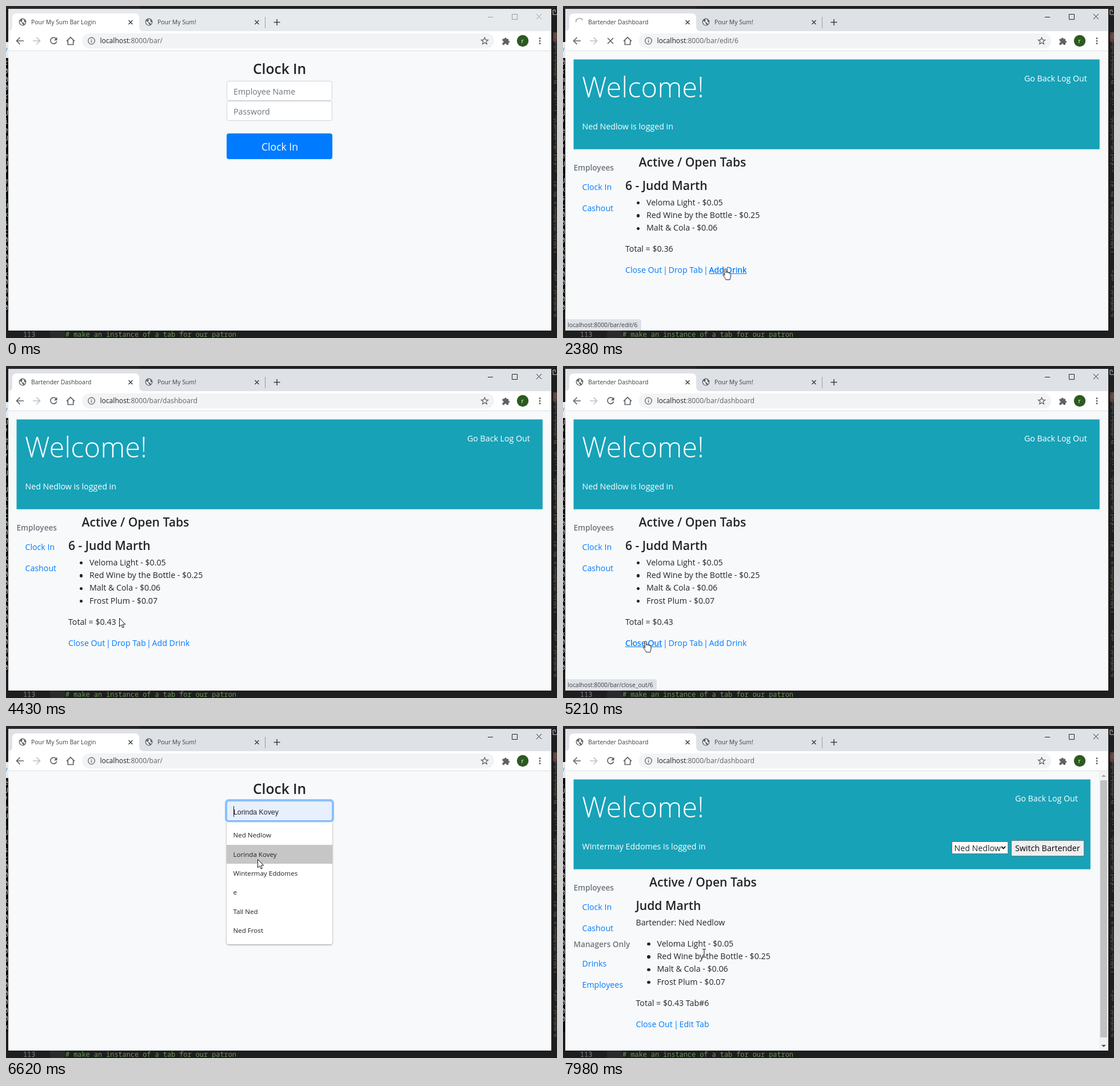
Write an HTML page that moves like this. It is 964x581 px and loops after 8000 ms.

```html
<!DOCTYPE html>
<html lang="en">
<head>
<meta charset="utf-8">
<title>Bar tabs demo</title>
<style>
html, body { margin: 0; width: 100%; height: 100%; overflow: hidden; background: #1e1e1e; }
#stage { position: absolute; left: 0; top: 0; width: 964px; height: 581px; overflow: hidden; background: #1e1e1e;
  font: 14.2px "Open Sans", "Noto Sans", sans-serif; color: #212529; }
#stage div, #stage svg, #stage span { position: absolute; box-sizing: border-box; }
svg { left: 0; top: 0; overflow: visible; }
#stage i { font-style: normal; }
.layer { left: 0; top: 0; width: 964px; height: 581px; }
.t { line-height: 0; white-space: pre; }
.tab { font-size: 10.4px; color: #3c4043; }
.url { font-size: 12.1px; color: #5f6368; }
.h2, .h3, .h4, .h5, .h6 { font-weight: 600; }
.h2 { font-size: 28.1px; }
.h3 { font-size: 24.6px; }
.h4 { font-size: 21.1px; }
.h5 { font-size: 17.6px; }
.h6 { font-size: 13.6px; color: #6c757d; }
.hero { font-size: 48.8px; font-weight: 300; }
.white { color: #fff; }
.link { color: #007bff; }
.u { text-decoration: underline; }
.hint { color: #6c757d; }
.dots { font-size: 15.4px; color: #495057; }
.big { font-size: 17.6px; }
.opt { font-size: 11.6px; font-weight: 500; color: #202124; }
.preview { font: 12.33px/0 "Liberation Sans", Arial, sans-serif; }
.mono { font: 11.87px "Noto Sans Mono", "DejaVu Sans Mono", monospace; line-height: 0; }
.field { left: 386px; width: 185px; height: 35px; background: #fff; border: 1px solid #ced4da; border-radius: 4px; }
.auto { background: #e8f0fe; }
.focus { border-color: #80bdff; box-shadow: 0 0 0 3px rgba(0,123,255,.25); }
.submit { left: 386px; top: 223px; width: 185px; height: 45px; background: #007bff; border-radius: 4px; }
.hover { background: #0069d9; }
.ring { box-shadow: 0 0 0 3px rgba(0,123,255,.45); }
.menu { left: 386px; top: 167px; width: 185px; height: 215px; background: #fff; border-radius: 0 0 4px 4px;
  box-shadow: 0 1px 3px rgba(0,0,0,.4); }
.row { left: 386px; width: 185px; height: 33px; background: #c6c6c6; }
.btn { height: 27.7px; padding: 0 6px; border: 1px solid #767676; border-radius: 2px; background: #efefef;
  color: #000; line-height: 26px; white-space: pre; }
.status { left: 4px; top: 548px; height: 20px; padding: 0 7px 0 4px; background: #dee1e6; border-radius: 0 4px 0 0;
  font-size: 10.4px; line-height: 21px; color: #3c4043; white-space: pre; }
.wide { width: 315px; }
.dot { width: 5.4px; height: 5.4px; border-radius: 50%; background: #212529; }
#log { left: 0; top: 92px; width: 4px; height: 443px; overflow: hidden; background: #0c0c0c; }
#lines { left: -3.5px; top: 0; color: #ccc; white-space: pre; font: 12px/14.78px "Noto Sans Mono", "DejaVu Sans Mono", monospace; }
#spin { transform-origin: 29px 28px; animation: spin 1s linear infinite; }
@keyframes spin { to { transform: rotate(360deg); } }
</style>
</head>
<body>
<div id="stage">
  <div style="left:0;top:0;width:234px;height:5px;background:#292729"></div>
  <div style="left:234px;top:0;width:730px;height:5px;background:#211f20"></div>
  <div style="left:0;top:63px;width:4px;height:28px;background:#e8e8e8"></div>
  <span class="t mono" style="left:-3px;top:77px;color:#3b8eea">/</span>
  <div id="log"><div id="lines"></div></div>
  <svg id="map" width="964" height="581"></svg>
  <div style="left:77px;top:568px;width:26px;height:13px;background:#2a2a2a"></div>
  <span class="t mono" style="left:30px;top:574px;color:#858585">113</span>
  <span class="t mono" style="left:104px;top:574px;color:#6a9955"># make an instance of a tab for our patron</span>

  <div style="left:4px;top:5px;width:950px;height:563px;background:#f8f9fa"></div>
  <div style="left:4px;top:5px;width:950px;height:39px;background:#dee1e6"></div>
  <div data-on="0-300" style="left:4px;top:5px;width:950px;height:39px;background:#e7eaed"></div>
  <div style="left:4px;top:44px;width:950px;height:35px;background:#fff;border-bottom:1px solid #dcdee1"></div>
  <div style="left:133px;top:48px;width:721px;height:26px;border-radius:13px;background:#f1f3f4"></div>
  <svg width="964" height="581" fill="none" stroke="#5f6368" stroke-width="1.7">
    <defs>
      <g id="globe" stroke="none">
        <circle r="6.4" fill="#5f6368"/>
        <path fill="#fff" d="M-4.9-1.8L-1.2.4l.4 2 1.6 1-.6 2C-3 5-5.4 2-4.9-1.8zM-1.2-5c1.5-.4 3 .2 4.3 1.4L2-1.8 3.4 0 5 .6C4.8 2 4.2 3 3.4 3.700L2.2 1.200-.6.2-1.4-1.600.2-2.800z"/>
      </g>
    </defs>
    <path stroke="none" fill="#fff" d="M3 44q8 0 8-8V21q0-8 8-8H225q8 0 8 8V36q0 8 8 8z"/>
    <use href="#globe" x="250" y="28"/>
    <path stroke="#3c4043" stroke-width="1.5" d="M214.500 25l7 7m0-7l-7 7M435.500 25l7 7m0-7l-7 7M468.500 28.500h11m-5.500-5.500v11"/>
    <path stroke="#9a9da2" stroke-width="1" d="M453.500 19v20"/>
    <path d="M31 61H18.500m6-6l-6 6 6 6"/>
    <path stroke="#bdc1c6" d="M47 61h12.500m-6-6l6 6-6 6"/>
    <path d="M106 61.500l7-6.700 7 6.700m-11.700-2v8h9.400v-8"/>
    <circle cx="149.500" cy="61" r="5.800" stroke-width="1.3"/>
    <path stroke-width="1.4" d="M149.500 60v4m0-6.600v1.400"/>
    <path stroke-width="1.3" d="M837.500 55.200l1.700 4 4.300.3-3.300 2.800 1 4.200-3.700-2.300-3.700 2.300 1-4.200-3.300-2.800 4.300-.3z"/>
    <path stroke="none" fill="#5f6368" d="M868.500 57.500h3.300a2 2 0 0 1 4 0h3.200v3.200a2 2 0 0 1 0 4v3.300h-3.300a2 2 0 0 0-4 0h-3.200v-3.300a2 2 0 0 0 0-4z"/>
    <circle cx="904" cy="61" r="10.2" fill="#2d5a1f" stroke="none"/>
    <g fill="#5f6368" stroke="none"><circle cx="934" cy="56.5" r="1.5"/><circle cx="934" cy="61" r="1.5"/><circle cx="934" cy="65.5" r="1.5"/></g>
    <g data-on="0-1140 1700-2280 2460-2790 2960-3870 4100-6180 6360-7360 7700-8000">
      <use href="#globe" x="29" y="28"/>
      <path d="M87.800 57.300a5.500 5.500 0 1 0 .9 4.700"/><path fill="#5f6368" stroke="none" d="M89.500 54.500v5.800h-5.800z"/>
    </g>
    <g data-on="1140-1700 2280-2460 2790-2960 3870-4100 6180-6360 7360-7700">
      <path id="spin" stroke="#9a9da2" stroke-width="1.6" d="M23 27a6.200 6.200 0 0 0 11 5"/>
      <path d="M78 56l10 10m0-10l-10 10"/>
    </g>
    <g stroke-width="1">
      <path data-on="0-300" stroke="#999" d="M843 19.500h9M885.500 14.500h9v9h-9zM928 14l9 9m0-9l-9 9"/>
      <path data-on="300-8000" stroke="#222" d="M843 19.500h9M885.500 14.500h9v9h-9zM928 14l9 9m0-9l-9 9"/>
    </g>
  </svg>
  <div id="view" class="layer"></div>
  <svg id="cursor" width="20" height="24" stroke="#111" stroke-width="1">
    <path data-on="40-500 570-985 1700-2180 2460-3760 4100-4680 5960-6110 6360-6450 6530-7100 7700-7900" fill="#fff" d="M.5.500V15l3.300-3.200L6 17l2.300-1-2.200-5h4.700z"/>
    <path data-on="985-1700 2180-2460 3760-4100 4680-5960 6110-6360 7100-7700" fill="#fff" transform="translate(-5.5 -1)" d="M4 12.500V2.200a1.500 1.500 0 0 1 3 0V8v-.8a1.400 1.400 0 0 1 2.800 0v1a1.400 1.400 0 0 1 2.600 0v1a1.300 1.300 0 0 1 2.400 0V14c0 3-1 4-1.500 6H6.500C6 18 3.500 15.500 1.700 12.500.9 11 2.300 10.100 3.300 11.100z"/>
    <path data-on="500-570 6450-6530 7900-8000" fill="none" d="M-3-6.500h2.500l.5.500.500-.5H3M-3 7.500h2.500l.5-.5.500.5H3M0-6V7"/>
  </svg>
</div>
<script>
const LOOP = 8000;
const NED = 'Ned Nedlow', JUDD = 'Judd Marth', LORINDA = 'Lorinda Kovey', WINTER = 'Wintermay Eddomes';
const byId = id => document.getElementById(id);
const on = spans => spans ? ` data-on="${spans}"` : '';
const t = (x, y, text, cls = '', spans) => `<span class="t ${cls}"${on(spans)} style="left:${x}px;top:${y}px">${text}</span>`;
const box = (cls, style = '', spans, text = '') => `<div class="${cls}"${on(spans)} style="${style}">${text}</div>`;
const layer = (spans, ...parts) => box('layer', '', spans, parts.join(''));
const svg = shapes => `<svg width="964" height="581">${shapes}</svg>`;
const rect = (x, y, w, h, color) => svg(`<rect x="${x}" y="${y}" width="${w}" height="${h}" fill="${color}"/>`);
const button = (x, y, text) => box('btn', `left:${x}px;top:${y}px`, '', text);
const bullet = (x, y, text) => box('dot', `left:${x - 17.2}px;top:${y - 1.9}px`) + t(x, y, text);

const drinks = ['Veloma Light - $0.05', 'Red Wine by the Bottle - $0.25', 'Malt &amp; Cola - $0.06', 'Frost Plum - $0.07'];
const total = n => `Total = $0.${n > 3 ? 43 : 36}`;
const list = (x, y, n) => drinks.slice(0, n).map((d, i) => bullet(x, y + i * 22.2, d)).join('');
const banner = (w, h, linksX) => rect(18.5, 93.5, w, h, '#17a2b8') + t(33, 141.4, 'Welcome!', 'hero white') +
  t(linksX, 127, 'Go Back Log Out', 'white');
const sidebar = (y, ...links) => t(18.5, y, 'Employees', 'h6') +
  links.map((s, i) => t(33.5, y + 34.3 + i * 37, s, 'link')).join('');

// Browser bar
const bar = [
  t(265, 28, 'Pour My Sum!', 'tab'),
  t(44, 28, 'Pour My Sum Bar Login', 'tab', '0-1140 6360-7360'),
  t(44, 28, 'localhost:8000/bar/dashboard', 'tab', '1140-1700 7360-7700'),
  t(44, 28, 'Bartender Dashboard', 'tab', '1700-2460 4100-6360 7700-8000'),
  t(44, 28, 'Bar Tabs', 'tab', '2460-4100'),
  t(901.5, 60.5, 'r', 'tab white'),
  ...[['', '0-1140 6200-7360'], ['dashboard', '1140-2300 3900-6200 7360-8000'], ['edit/6', '2300-3900']].map(([path, spans]) =>
    t(164.5, 61, `<i style="color:#202124">localhost</i>:8000/bar/${path}`, 'url', spans))
];

// Sign-in form with its name suggestions
const hoverRow = (i, name, spans) => box('row', `top:${174.7 + i * 33.3}px`, spans) +
  box('field auto focus', 'top:131px', spans) + t(398, 150.5, name, 'preview', spans);
const login = layer('0-1700 6360-7700',
  t(432, 110, 'Clock In', 'h3'),
  box('field', 'top:131px'), box('field', 'top:166px'),
  t(398, 150, 'Employee Name', 'hint'), t(398, 185, 'Password', 'hint'),
  box('submit'),
  box('submit hover', '', '985-1700 7100-7700'),
  box('submit hover ring', '', '1100-1700 7340-7700'),
  t(447, 246, 'Clock In', 'big white'),
  layer('860-1700 6880-7700', box('field auto', 'top:131px'), box('field', 'top:166px'), t(398.5, 186, '•••••••••', 'dots')),
  layer('520-860 6500-6880', box('field focus', 'top:131px'), t(398, 150, 'Employee Name', 'hint')),
  box('field auto focus', 'top:131px', '860-1100 6880-7340'),
  t(398, 150, NED, '', '860-1700'), t(398, 150, WINTER, '', '6880-7700'),
  box('menu', '', '540-860 6540-6880'),
  hoverRow(0, NED, '690-860'), hoverRow(1, LORINDA, '6580-6690'), hoverRow(2, WINTER, '6690-6880'),
  layer('540-860 6540-6880',
    [NED, LORINDA, WINTER, 'e', 'Tall Ned', 'Ned Frost'].map((s, i) => t(397.5, 191.3 + i * 33.3, s, 'opt')).join('')),
  box('', 'left:398px;top:140px;width:1px;height:19px;background:#222', '520-860 6500-6880'));

// Open tabs
const dashboard = (spans, n) => {
  const y = 344 + n * 22.2;
  return layer(spans, banner(920.3, 157.2, 807), t(33.5, 211, NED + ' is logged in', 'white'),
    sidebar(283, 'Clock In', 'Cashout'),
    t(132.5, 273, 'Active / Open Tabs', 'h4'), t(109, 313.5, '6 - ' + JUDD, 'h4'),
    list(146, 344, n), t(109, y + 14.7, total(n)),
    t(109, y + 51.7, 'Close Out', 'link'), t(175, y + 51.7, '|', 'link'), t(184.5, y + 51.7, 'Drop Tab', 'link'),
    t(246, y + 51.7, '|', 'link'), t(255.5, y + 51.7, 'Add Drink', 'link'));
};
const underlines = [
  t(255.5, 462.3, 'Add Drink', 'link u', '2180-2460'),
  t(255.5, 484.5, 'Add Drink', 'link u', '4680-4830'),
  t(184.5, 484.5, 'Drop Tab', 'link u', '4860-5050'),
  t(109, 484.5, 'Close Out', 'link u', '5080-5960'),
  t(33.5, 317.3, 'Clock In', 'link u', '6110-6360')
];

// Tab editor
const menu = [
  ['Talbo', 'Cabernet Sauvignon', 'Moscow Mule', 'Frost Plum', 'White Wine by the Bottle', 'Vodka Mix', 'Pilsner Pint'],
  ['Ondrela', 'Whiskey Shot', 'Whiskey Sour', 'Malt &amp; Cola', 'Wheat Pint', 'Tequila Shot', 'Manhattan'],
  ['Hazy IPA', 'Cosmopolitan', 'Veloma Light', 'Red Wine by the Bottle', 'Dunmarra Pint', 'Soda', 'Martini']
];
const editor = layer('2460-4100', banner(920.3, 135.2, 807),
  `<span class="t white" style="right:40px;top:189px">${NED} is logged in</span>`,
  sidebar(261, 'Clock In', 'Schedule', 'Cashout'),
  t(107.5, 248.5, 'Add Drink', 'h5'), t(745, 255.5, 'Edit Tab #6', 'h2'),
  menu.map((col, c) => col.map((s, r) => button(135 + c * 198.7, 266 + r * 27.7, s)).join('')).join(''),
  bullet(782, 290.5, drinks[0]), bullet(782, 312.7, 'Red Wine by the'), t(782, 335, 'Bottle - $0.25'), bullet(782, 357, drinks[2]),
  t(745, 394, total(3), '', '2460-2960'),
  layer('2960-4100', bullet(782, 379.3, drinks[3]), t(745, 416, total(4))));

// Manager's view of the open tabs
const manager = layer('7700-8000', banner(904.3, 157.2, 791), t(33.5, 211, WINTER + ' is logged in', 'white'),
  box('', 'left:680px;top:202px;width:99px;height:22px;background:#fff;border:1px solid #767676'),
  t(684.5, 213.5, NED),
  svg('<path d="M767 211l3.5 3.5 3.5-3.5" fill="none" stroke="#111" stroke-width="1.8"/>'),
  button(784, 200, 'Switch Bartender'),
  sidebar(283, 'Clock In', 'Cashout'),
  t(18.5, 382, 'Managers Only', 'h6'), t(33.5, 416, 'Drinks', 'link'), t(33.5, 453, 'Employees', 'link'),
  t(151, 273, 'Active / Open Tabs', 'h4'), t(127.5, 313.5, JUDD, 'h4'), t(127.5, 344, 'Bartender: ' + NED),
  list(164.5, 381, 4), t(127.5, 484.5, total(4) + ' Tab#6'),
  t(127.5, 521.5, 'Close Out', 'link'), t(194, 521.5, '|', 'link'), t(203.5, 521.5, 'Edit Tab', 'link'),
  rect(938, 79, 16, 489, '#f1f1f1'), rect(940, 95, 12, 450, '#c1c1c1'),
  svg('<path fill="#a3a3a3" d="M942 89l4-4 4 4z"/><path fill="#505050" d="M942 558l4 4 4-4z"/>'));

const status = [
  ['edit/6', '2180-2460 4680-4830'], ['dashboard', '3760-4100'], ['drop_tab/6', '4860-5050'],
  ['close_out/6', '5080-6080'], ['', '6110-6360']
].map(([path, spans]) => box('status', '', spans, 'localhost:8000/bar/' + path));
status.push(box('status wide', '', '1180-1700 2800-2960 7380-7700', 'Processing request...'));

byId('view').innerHTML = [...bar, login, dashboard('1700-2460', 3), editor, dashboard('4100-6360', 4),
  manager, ...underlines, ...status].join('');

byId('lines').textContent = [...'r000rmUieU/eU/eU.Ukst0000k0000k000k00000k0000'].join('\n');

// Sliver of the code overview at the right edge
let seed = 7;
const rnd = () => (seed = seed * 16807 % 2147483647) / 2147483647;
let specks = '<path d="M957 7h4v4m-4-4v8h7" fill="none" stroke="#ccc"/><rect x="957" y="46" width="7" height="16" fill="#5a4038"/>';
for (let y = 45; y < 545; y += 2.5) {
  if (rnd() < .3 + .3 * Math.sin(y / 22)) continue;
  const w = 1 + rnd() * 4;
  specks += `<rect x="${963 - w}" y="${y}" width="${w}" height="1" fill="${rnd() < .2 ? '#7d6a55' : '#666'}"/>`;
}
byId('map').innerHTML = specks;

// Timing: every part gets its own keyframes over one loop
const sheet = [];
const at = (ms, rule) => `${(ms / LOOP * 100).toFixed(4)}%{${rule}}`;
function animate(el, name, frames, easing) {
  sheet.push(`@keyframes ${name}{${frames.join('')}}`);
  el.style.animation = `${name} ${LOOP}ms ${easing} infinite`;
}
document.querySelectorAll('[data-on]').forEach((el, i) => {
  const frames = [at(0, 'opacity:0')];
  for (const span of el.dataset.on.split(' ')) {
    const [from, to] = span.split('-').map(Number);
    frames.push(at(from, 'opacity:1'));
    if (to < LOOP) frames.push(at(to, 'opacity:0'));
  }
  animate(el, 'on' + i, frames, 'step-end');
});
const scroll = [[0, 0], [1200, 3], [2460, 5], [2960, 7], [4100, 9], [6360, 11], [7700, 16]];
animate(byId('lines'), 'scroll', scroll.map(([ms, n]) => at(ms, `transform:translateY(${-n * 14.78}px)`)), 'step-end');

const path = [
  [0, 895, 489], [59, 895, 489], [60, 848, 330], [240, 848, 330], [500, 440, 150], [570, 440, 160], [700, 436, 190], [870, 436, 190],
  [1010, 458, 238], [1920, 458, 238], [2200, 284, 460], [2460, 284, 460], [2600, 180, 363], [2970, 180, 363],
  [3150, 730, 468], [3580, 730, 468], [3780, 833, 126], [4110, 833, 126], [4370, 252, 331], [4430, 198, 441],
  [4590, 198, 441], [4720, 282, 482], [4800, 280, 482], [4950, 216, 482], [5180, 146, 482], [5290, 138, 481],
  [5670, 138, 481], [5980, 117, 463], [6015, 117, 463], [6120, 58, 315], [6360, 58, 315], [6460, 440, 150],
  [6510, 440, 152], [6600, 440, 233], [6640, 440, 233], [6740, 441, 257], [6890, 441, 257], [7100, 458, 240],
  [7300, 460, 240], [7720, 460, 240], [7960, 247, 397], [8000, 247, 397]
];
animate(byId('cursor'), 'move', path.map(([ms, x, y]) => at(ms, `transform:translate(${x}px,${y}px)`)), 'ease-in-out');

const style = document.createElement('style');
style.textContent = sheet.join('\n');
document.head.append(style);
</script>
</body>
</html>
```
